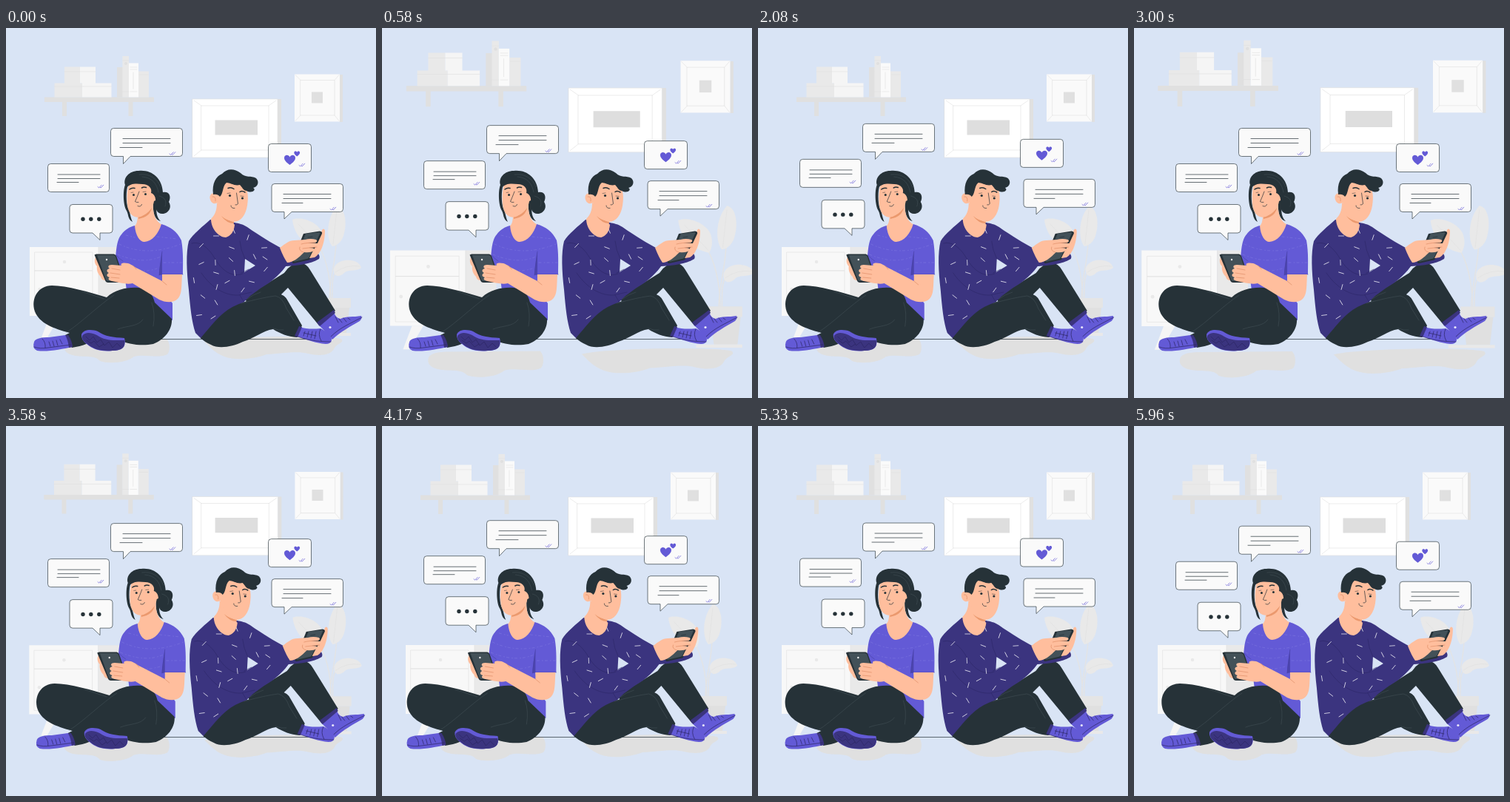
Recreate the animation shown at these times as an HTML page. Size 500 by 500 pixels, loop 6000 ms.

```html
<!DOCTYPE html>
<html lang="en">
<head>
<meta charset="utf-8">
<title>Chatting</title>
<style>
html, body { margin: 0; width: 100%; height: 100%; overflow: hidden; background: #d9e4f5; }
svg { display: block; width: 100%; height: 100%; }
.line { fill: none; stroke: #263238; stroke-width: .7; stroke-linecap: round; stroke-linejoin: round; }
.soft { stroke: #e0e0e0; stroke-width: .6; }
.crease { stroke: #46545b; stroke-width: .5; }
.fold { stroke: #4740a5; stroke-width: .6; }
.seam { stroke: #2c2767; stroke-width: .6; }
.brow { stroke-width: 1.500; }
.dash { stroke: #7a73de; stroke-width: .7; stroke-dasharray: 3 4 1 3; }
.white { stroke: #e4e3ef; stroke-width: .8; }
.tick { stroke: #635ad6; stroke-width: .7; }
.joint { stroke: #d98760; stroke-width: .6; }
.lace { stroke: #2b2664; stroke-width: .7; }
.dark { fill: #263238; }
.skin { fill: #ffbe9d; }
.shade { fill: #eb996e; }
.violet { fill: #635ad6; }
.deep { fill: #3b347f; }
.phone { fill: #435158; }
.g1 { fill: #fafafa; }
.g2 { fill: #f5f5f5; }
.g3 { fill: #e9e9e9; }
.g4 { fill: #e0e0e0; }
.card { fill: #fafafa; stroke: #263238; stroke-width: .65; stroke-linejoin: round; }
</style>
</head>
<body>
<svg viewBox="0 0 500 500">
  <g id="room">
    <!-- floor shadows -->
    <path class="g4" d="M79 430C80 424 86 422 100 421L217 420C222 425 222 437 218 441C206 447 187 440 173 444C162 453 138 454 127 450C121 442 107 445 94 443C82 441 78 436 79 430Z"/>
    <path class="g4" d="M268 424C300 416 430 415 453 420C458 425 448 426 444 432C439 444 421 443 408 440C394 436 374 440 352 441C338 447 310 450 295 444C281 439 273 428 268 424Z"/>

    <!-- shelf -->
    <path class="g4" d="M52 93.500H200V100H171.500V119H165.500V100H82V119H76V100H52Z"/>
    <path class="g3" d="M65.500 74.500H103V93.500H65.500ZM79 52.500H100V74.500H79Z"/>
    <path class="g2" d="M103 74.500H142.500V93.500H103ZM100 52.500H121V74.500H100Z"/>
    <path class="line soft" d="M65.500 79H142.500M79 59H121"/>
    <path class="g4" d="M150 53H158V93.500H150Z"/>
    <path class="g3" d="M157.500 38H166V93.500H157.500ZM179 58.500H193V93.500H179Z"/>
    <path class="g1" d="M166 47.500H179V93.500H166Z"/>
    <path class="line soft" d="M157.500 44H166M157.500 86H166M168 53H177M168 56H177M168 86H177M172 60V82M180 63H192"/>
    <circle cx="162" cy="48" r="2" class="g4"/>

    <!-- frames -->
    <path class="g4" d="M367 96H372V175H367ZM451 63H455V127H451Z"/>
    <path fill="#fff" d="M252 96H367V175H252Z"/>
    <path class="g1" d="M390 62.500H451V126.500H390Z"/>
    <path class="line soft" d="M252 96H367V175H252ZM264 105H355V165H264ZM254 98L264 105M365 98L355 105M254 173L264 165M365 173L355 165"/>
    <path class="line soft" d="M398 70.500H444V118H398ZM391 63.500L398 70.500M450 63.500L444 70.500M391 125.500L398 118M450 125.500L444 118"/>
    <path fill="#dedede" d="M282.500 124.500H340V144.500H282.500Z"/>
    <path class="g4" d="M413 86.500H428V101.500H413Z"/>

    <!-- cabinet -->
    <path class="g2" d="M59 389H73L56 418H48Z"/>
    <path class="g3" d="M125 296H163V389H125Z"/>
    <path fill="#f8f8f8" d="M32 296H125V389H32Z"/>
    <path class="line soft" d="M39 303H117V328H39ZM39 328H117V384H39ZM125 296V389"/>
    <circle cx="79" cy="316" r="2.200" class="g3"/>
    <circle cx="45.500" cy="353" r="2.200" class="g3"/>

    <!-- plant -->
    <path class="line" style="stroke:#e4e4e4;stroke-width:1.300" d="M437 366C437 340 445 320 446 290M439 366C438 330 430 305 420 290M441 366C441 350 440 335 447 328"/>
    <path class="g3" d="M387 259C399 254 421 262 427 276C431 288 427 296 425 299C409 296 390 285 387 259Z"/>
    <path class="g3" d="M447 241C458 243 461 262 457 277C455 288 448 294 441 295C433 286 432 258 447 241Z"/>
    <path class="g3" d="M443 328C442 318 455 312 466 314C474 315 479 319 480 324C475 329 465 326 458 330C451 338 443 336 443 328Z"/>
    <path class="line soft" d="M395 265L424 296M447 246L442 292M445 330Q460 319 478 322"/>
    <path class="g4" d="M427 378H464L460 412H431Z"/>
    <path fill="#e5e5e5" d="M424 365H466V378H424Z"/>
    <path class="g3" d="M409 412H466V416H409Z"/>
  </g>

  <path class="line" d="M112 420.500H412"/>

  <g id="people">
    <!-- woman: hair behind the head -->
    <path class="dark" d="M165 211C162 220 162 236 165 244C168 249 168 256 171 262C164 258 166 252 163 247C158 239 158 219 161 212C158 203 166 193 179 193C196 191 211 202 212 222C220 220 224 227 220 235C225 243 219 251 211 251C204 251 201 244 204 237C202 248 204 257 209 261C200 259 198 247 199 234L190 212Z"/>
    <!-- neck and chest -->
    <path class="skin" d="M178 250L199 234C198 248 200 260 211 266L201 287L186 291L173 281L173 268C177 266 178 260 178 250Z"/>
    <path class="shade" d="M179 255Q190 253 197 243Q195 255 179 258Z"/>
    <path class="skin" d="M166 211C163 222 163 236 165 244C168 255 177 258 184 254C193 250 199 242 200 234C207 232 206 220 199 222L197 210Q178 203 166 211Z"/>
    <path class="dark" d="M163 216C159 206 166 194 180 194C198 193 209 204 211 222C209 228 206 232 202 236C203 229 200 224 196 223C198 216 192 211 185 211C174 210 168 210 163 216Z"/>
    <path class="line crease" d="M184 201C198 202 204 211 206 222M180 198C194 196 205 204 209 215M207 227C214 229 218 233 215 241"/>
    <circle cx="172.500" cy="225.500" r="1.500" class="dark"/>
    <circle cx="188.500" cy="224.500" r="1.500" class="dark"/>
    <path class="line brow" d="M167 218Q170 215.500 174 216.500M183.500 216Q186 214.500 189.500 215.500"/>
    <path class="line" d="M180 221Q177 229 174.500 234.500Q176 236 179 235.500M178 240.500Q182 242.500 183.500 238.500"/>
    <path class="line" style="stroke-width:.5" d="M169 222.500L172 222M185 221.500L189 221"/>

    <!-- shirt -->
    <path class="violet" d="M174 267C175 281 181 289 187 289C198 288 206 278 210 265C223 269 231 275 237 287C240 304 239 320 239 333H211C213 350 218 364 225 372V395L165 370L160 332L147 320C149 308 148 288 156 279C161 272 167 269 174 267Z"/>
    <path fill="#4c45ae" d="M211 302C209 314 207 325 207 334L211 333Z"/>
    <path class="line fold" d="M211 302C209 316 208 325 207 334M239 333H208M149 307Q153 312 158 315"/>
    <path class="line dash" d="M153 292Q190 310 236 292M151 306Q184 320 209 309M158 323Q184 333 207 324M213 317H238M162 280L174 283M204 282L231 285"/>

    <!-- trousers -->
    <path class="dark" d="M62 348C83 348 112 357 136 364C148 353 165 350 179 351C194 353 199 362 201 371L224 393C225 408 214 421 199 427C184 430 166 428 151 421L128 415C117 425 103 430 89 432L80 415L86 412C64 406 45 399 39 383C33 365 44 348 62 348Z"/>
    <path class="line crease" d="M82 411C101 399 126 374 146 361M151 407C163 402 178 404 185 394M197 371Q202 385 199 403M103 356Q123 363 132 366"/>

    <!-- woman's shoes -->
    <path class="violet" d="M38 424C40 419 49 418 58 418L80 415Q87 421 89 431C76 434 56 438 42 436Q35 433 38 424Z"/>
    <path class="deep" d="M80 415L84 415Q89 422 90 431L85 432Q84 422 80 415Z"/>
    <path class="line lace" d="M38 431Q46 434 57 432L88 428M58 424L60 430M63 423L65 430M68 422L70 429M73 421L76 427M49 420Q54 425 53 432"/>
    <path class="violet" d="M102 414C105 407 116 407 124 410C134 417 145 418 160 419C163 431 157 436 144 436C128 438 117 434 109 427Q101 421 102 414Z"/>
    <path class="deep" d="M103 416C108 409 119 412 126 417C136 423 149 422 160 422C162 431 157 436 144 436C128 437 118 434 110 427Q102 422 103 416Z"/>
    <path class="line lace" d="M108 417L113 422L118 417L123 425L128 421L133 429L139 424L144 432L150 426L155 431M109 422L115 426L119 423L126 431L132 427"/>

    <!-- woman's arms and phone -->
    <path class="skin" d="M122 309C119 312 119 318 123 322C122 328 125 333 128 336C129 341 134 342 142 341L145 330L127 307Z"/>
    <path class="dark" d="M119.500 306.500L122 305.500H146Q148 306 149 308L161 342Q161 344 158 344H138Q135 344 134 341Z"/>
    <path class="phone" d="M123 307H145Q147 307 148 309L159 342H138Q136 342 135 340Z"/>
    <circle cx="136" cy="313" r="1.200" fill="#f2f2f2"/>
    <path class="skin" d="M211 333H238C237 349 238 360 232 366C226 372 215 371 207 367L171 345C163 347 154 344 143 342C139 341 137 339 140 337C136 336 135 333 139 331C135 329 136 326 140 325C137 323 138 320 143 320L156 321C154 317 160 317 165 318C171 320 173 323 178 325L211 342Z"/>
    <path class="line joint" d="M143 325L154 327M141 331L154 333M142 337L153 338M172 321L176 326M211 342L217 347"/>

    <!-- man: far leg and shoe -->
    <path class="dark" d="M323 364L376 331Q384 318 398 317.500Q406 318 411 327L445 382L423 402L381 351L365 367L328 380Z"/>
    <path class="violet" d="M422 401L443 383Q445 392 452 393C460 389 469 391 480 389Q482 392 478 396C464 404 453 410 441 421Q433 411 422 401Z"/>
    <path class="deep" d="M420 398L443 381L445 385L424 403Z"/>
    <path class="line lace" d="M439 417C451 405 464 400 481 391M445 390L449 398M450 393L454 398M456 392L460 397M462 392L465 394"/>
    <circle cx="438" cy="404.500" r="1.600" fill="#e8e6fa"/>

    <!-- man: far hand -->
    <path class="deep" d="M377 316L421 304Q425 308 423 312C411 319 395 321 378 322Z"/>
    <path class="skin" d="M409 311C419 310 426 300 429 288L430 273Q429 270 427 273L424 284L412 291Z"/>

    <!-- sweater -->
    <path class="deep" fill-rule="evenodd" d="M276 259C267 267 252 279 247 288C243 304 244 328 247 354C249 378 251 397 256 412L264 420L292 399L330 362L345 351C361 342 372 331 381 318L371 297C360 291 343 281 326 269C320 265 314 264 309 263ZM323 312L337 321L322 330Z"/>
    <path class="line seam" d="M251 291C262 288 273 296 282 311C291 327 305 338 320 332M323 312Q317 300 316 288M264 331C274 346 292 362 314 361L332 357M318 331L328 326M316 361L322 371"/>
    <g id="flecks" class="line white"></g>
    <path class="skin" d="M277 258C282 253 285 247 285 236L307 252C305 260 306 263 309 266C308 275 304 281 297 283C288 283 277 272 277 258Z"/>
    <path class="shade" d="M291 254Q300 262 308 260L308 264Q298 264 291 254Z"/>

    <!-- man's head -->
    <path class="skin" d="M286 225C278 220 274 226 276 232C278 238 283 238 286 236C289 249 297 260 307 262C318 262 324 252 326 240C328 228 327 218 321 211L297 205Z"/>
    <path class="dark" d="M280 225C278 210 284 200 292 197C299 189 309 190 317 196C324 203 331 199 338 203C343 208 340 215 334 216C339 219 332 224 325 220C321 220 319 215 316 212C309 214 303 209 298 209C292 214 294 224 289 228Q286 224 280 225Z"/>
    <path class="line joint" d="M279 228Q284 227 283 234"/>
    <circle cx="302.500" cy="226.500" r="1.600" class="dark"/>
    <circle cx="319.500" cy="230" r="1.600" class="dark"/>
    <path class="line brow" d="M300 216.500Q304 214.500 308 217.500M316 221.500Q319 219.500 323 222"/>
    <path class="line" d="M311.500 223L313.500 237.500Q312 239.500 310 239M304 240Q304 244 309 243.500"/>
    <path class="line" style="stroke-width:.5" d="M299 223.500L303 223M317 227L321 227.500"/>

    <!-- man's phone and near hand -->
    <path class="dark" d="M402 278L424 274.500Q428 275 427 278L411 312Q410 314 407 314L389 318Q386 318 387 315Z"/>
    <path class="phone" d="M405 278L423 276Q425 276 424 278L410 309Q409 312 406 312L389 316Z"/>
    <path class="skin" d="M370 297C377 292 382 287 390 287L404 286Q412 284 419 286Q422 288 418 290L408 291L421 291Q425 293 420 296L409 297Q418 297 417 300Q413 304 403 303C396 310 388 317 380 317Q375 310 370 297Z"/>
    <path class="skin" d="M421 291C427 288 428 281 428 273Q430 270 431 274C431 289 426 305 417 310L410 311L414 303Z"/>
    <path class="line joint" d="M399 292Q406 290 418 290M401 298Q409 297 420 296M402 303Q395 301 397 296"/>
    <path class="line" d="M408 283L414 282"/>

    <!-- man: near leg and shoe -->
    <path class="dark" d="M263 419C276 404 289 386 306 377C326 367 348 362 367 359Q377 360 381 369L400 402L393 418C381 417 370 413 361 407C347 409 336 419 320 424C306 431 287 434 277 428Q268 424 263 419Z"/>
    <path class="line crease" d="M318 372Q347 364 364 362Q374 364 379 379L389 395M361 406Q368 409 375 408M326 366Q334 360 344 357"/>
    <path class="violet" d="M391 416L397 404C406 407 415 407 425 406C432 409 441 416 440 422Q439 427 432 427C419 426 406 421 391 416Z"/>
    <path class="deep" d="M390 416L396 403L400 404L394 418Z"/>
    <path class="line lace" d="M391 416C405 421 419 424 439 424M404 410L402 416M409 410L407 418M414 410L412 419M419 410L417 420M402 412L419 416M425 407Q421 414 426 423"/>
  </g>

  <g id="bubbles">
    <path class="card" d="M145.500 135.500H234.500Q238.500 135.500 238.500 139.500V169.500Q238.500 173.500 234.500 173.500H168L158.500 183.500V173.500H145.500Q141.500 173.500 141.500 169.500V139.500Q141.500 135.500 145.500 135.500Z"/>
    <rect class="card" x="56.500" y="183.500" width="83" height="38" rx="4"/>
    <path class="card" d="M90 238.500H140Q144 238.500 144 242.500V273Q144 277 140 277H127V286.500L117 277H90Q86 277 86 273V242.500Q86 238.500 90 238.500Z"/>
    <rect class="card" x="354.500" y="156.500" width="58" height="38" rx="4"/>
    <path class="card" d="M363 210.500H451.500Q455.500 210.500 455.500 214.500V244.500Q455.500 248.500 451.500 248.500H386L376 258V248.500H363Q359 248.500 359 244.500V214.500Q359 210.500 363 210.500Z"/>
    <path class="line" d="M158 149.500H222M158 155.500H222M154 161.500H184M70 198H127M70 203.500H127M69 208.500H98M375 224.500H439M375 230.500H439M373 236.500H401"/>
    <g class="dark"><circle cx="104" cy="258.300" r="2.700"/><circle cx="114.800" cy="258.300" r="2.700"/><circle cx="125.800" cy="258.300" r="2.700"/></g>
    <g id="ticks" class="line tick"></g>
    <path id="heart" class="violet" d="M383.500 185C379 181.500 376 179 376 175.500C376 171 382 170.500 383.500 174.500C385 170.500 391 171 391 175.500C391 179 388 181.500 383.500 185Z"/>
    <use href="#heart" transform="translate(193.800 77.200) scale(.52)"/>
  </g>
</svg>
<script>
const $ = id => document.getElementById(id);
const LOOP = 6000;

// Straight interpolation through [percent, value] stops
function track(stops, p) {
  const i = stops.findIndex(s => s[0] > p);
  const [a, u] = stops[i - 1], [b, v] = stops[i];
  return u + (v - u) * (p - a) / (b - a);
}
const beat = [[0, 1], [10, 1.1], [30, 1], [40, 1], [50, 1.1], [60, 1], [100, 1]];
const shake = [0, -1, 2, -4, 4, -4, 4, -4, 2, -1, 0].map((x, i) => [i * 10, x]);
const float = [[0, 0], [25, -10], [50, 0], [75, -10], [100, 0]];

const flecks = [[284, 281], [308, 274], [264, 294], [305, 297], [283, 317], [264, 318], [304, 313],
  [327, 283], [349, 297], [336, 309], [351, 326], [284, 331], [309, 331], [299, 343], [266, 363],
  [285, 350], [261, 388], [284, 371], [320, 354], [332, 343], [254, 341], [280, 391], [350, 311]];
$('flecks').innerHTML = flecks.map(([x, y], i) =>
  `<path d="M-3.500 0H3.500" transform="translate(${x} ${y}) rotate(${i * 67 % 180})"/>`).join('');

$('ticks').innerHTML = [[221, 170], [124, 214.5], [396, 185.5], [438, 244.5]].map(([x, y]) =>
  `<path d="M${x} ${y}l1.600 1.500l3.600 -3.800m-1.800 3.300l.8 .5l3.600 -3.800"/>`).join('');

function draw(now) {
  const p = now % LOOP / LOOP * 100;
  $('room').setAttribute('transform', `translate(250 250) scale(${track(beat, p)}) translate(-250 -250)`);
  $('people').setAttribute('transform', `translate(${track(shake, p)} 0)`);
  $('bubbles').setAttribute('transform', `translate(0 ${track(float, p)})`);
}

const start = performance.now();
function tick() {
  draw(performance.now() - start);
  requestAnimationFrame(tick);
}
tick();
</script>
</body>
</html>
```
